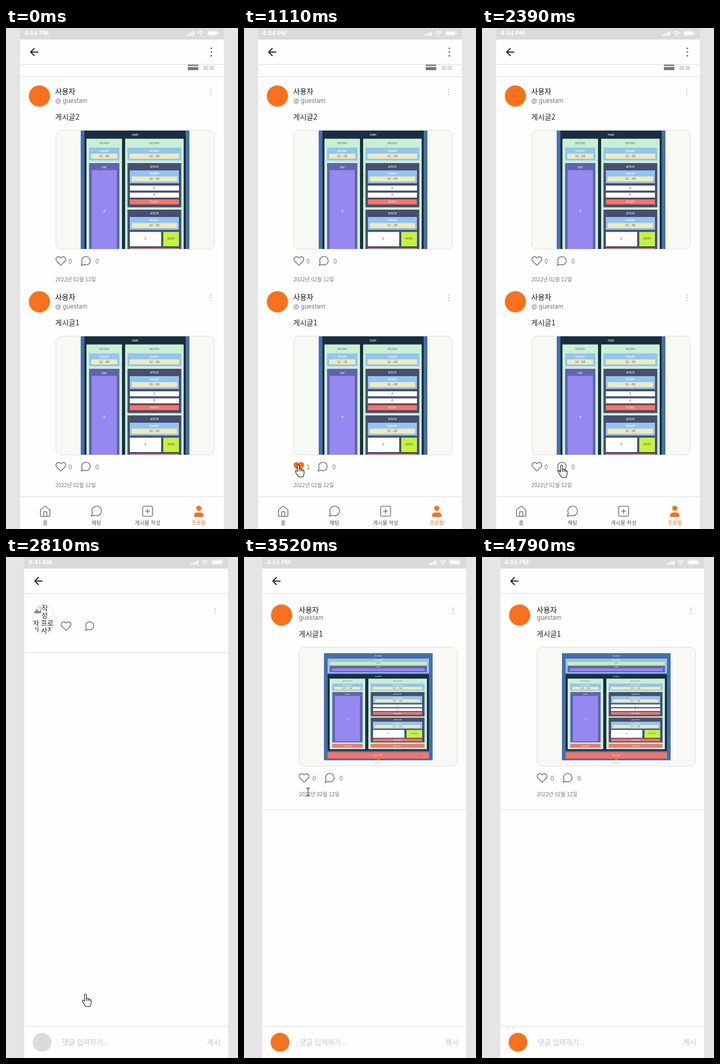
Recreate the animation shown at these times as an HTML page. Size 444 by 957 pixels, loop 5380 ms.

```html
<!DOCTYPE html>
<html lang="ko">
<head>
<meta charset="utf-8">
<title>게시글</title>
<style>
html, body { margin: 0; width: 100%; height: 100%; overflow: hidden; background: #e5e5e5; }
svg { display: block; width: 444px; height: 957px; }
text { font-family: "Noto Sans CJK KR", "Noto Sans CJK", sans-serif; white-space: pre; }
.latin { font-family: Inter, sans-serif; }
.line { fill: none; stroke: #767676; stroke-linecap: round; stroke-linejoin: round; }
.liked .heart { fill: #f9711a; stroke: #f9711a; }
.rule { stroke: #dbdbdb; }
</style>
</head>
<body>
<svg id="stage" viewBox="0 0 444 957"></svg>
<script>
const LOOP = 5380;
const GRAY = '#767676', PALE = '#c4c4c4', ORANGE = '#f9711a';
const USER = 'guestam';

const text = (x, y, s, size, fill = GRAY, more = '') =>
  `<text x="${x}" y="${y}" font-size="${size}" fill="${fill}" ${more}>${s}</text>`;
const box = (x, y, w, h, fill, more = '') =>
  `<rect x="${x}" y="${y}" width="${w}" height="${h}" fill="${fill}" ${more}/>`;
const disc = (x, y, r, fill, more = '') =>
  `<circle cx="${x}" cy="${y}" r="${r}" fill="${fill}" ${more}/>`;
const rule = y => `<path class="rule" d="M27 ${y}h390"/>`;
const group = (id, body, more = '') => `<g id="${id}" ${more}>${body}</g>`;
const dots = (x, y, gap, r, fill) =>
  [-gap, 0, gap].map(d => disc(x, y + d, r, fill)).join('');

// Line icons on a 24 unit grid, centred on x, y
const icon = (d, x, y, scale = 1, cls = '') =>
  `<path class="line ${cls}" stroke-width="${1.6 / scale}" d="${d}" transform="translate(${x} ${y}) scale(${scale}) translate(-12 -12)"/>`;
const HEART = 'M20.84 4.61a5.5 5.5 0 0 0-7.78 0L12 5.67l-1.06-1.06a5.5 5.5 0 0 0-7.78 7.78L12 21.23l8.84-8.84a5.5 5.5 0 0 0 0-7.78z';
const BUBBLE = 'M21 11.5a8.4 8.4 0 0 1-.9 3.8 8.5 8.5 0 0 1-7.6 4.7 8.4 8.4 0 0 1-3.8-.9L3 21l1.9-5.7a8.4 8.4 0 0 1-.9-3.8 8.5 8.5 0 0 1 4.7-7.6 8.4 8.4 0 0 1 3.8-.9h.5a8.5 8.5 0 0 1 8 8z';
const HOME = 'M3 9.5l9-7.5 9 7.5V20a2 2 0 0 1-2 2H5a2 2 0 0 1-2-2zM9 22v-9h6v9';
const PLUS = 'M5 2.5h14a2.5 2.5 0 0 1 2.5 2.5v14a2.5 2.5 0 0 1-2.5 2.5H5A2.5 2.5 0 0 1 2.5 19V5A2.5 2.5 0 0 1 5 2.5zM12 8v8M8 12h8';

const statusBar = clock =>
  box(27, 0, 390, 22, '#dadada') +
  text(35, 14, clock, 11.5, '#fff', 'class="latin" font-weight="600"') +
  [0, 1, 2, 3].map(i => box(346 + i * 3.8, 12 - i * 1.8, 2.6, 3 + i * 1.8, '#fff', 'rx=".6"')).join('') +
  `<g fill="none" stroke="#fff" stroke-width="1.7"><path d="M366.5 9a8.5 8.5 0 0 1 12 0M369 11.6a5 5 0 0 1 7 0"/></g>` +
  disc(372.5, 13.8, 1.3, '#fff') +
  box(385.5, 5.5, 20, 9, 'none', 'rx="2.5" stroke="#f1f1f1"') +
  box(387, 7, 17, 6, '#fff', 'rx="1.3"') + box(406.5, 8.5, 1.2, 3.4, '#f1f1f1');

const frame = clock =>
  box(27, 0, 390, 957, '#fefefe') + statusBar(clock) + rule(69.5) +
  `<path d="M61 46H47.5M54 39.2L47.2 46l6.8 6.8" fill="none" stroke="#1c2433" stroke-width="2" stroke-linecap="round" stroke-linejoin="round"/>`;

// Layout diagram shown in every post
function diagram() {
  const C = {
    blue: '#4570a6', sky: '#91c5f2', lime: '#c5f241', indigo: '#6163b0', violet: '#9588f0',
    navy: '#1b2e41', mint: '#caf0d3', cream: '#f3eab5', slate: '#474e70', coral: '#ff7264'
  };
  const tag = (x, y, s, fill = '#fff') =>
    text(x, y + 1.8, s, 5.6, fill, 'class="latin" text-anchor="middle"');
  const block = (x, y, w, h, fill, s, at = h / 2, ink) =>
    box(x, y, w, h, fill) + (s ? tag(x + w / 2, y + at, s, ink) : '');
  const head = (x, y, w, pad) =>
    block(x, y, w, 24.5, C.sky, 'header', 6.5) +
    block(x + pad, y + 11.5, w - 2 * pad, 9.5, C.cream, 'h2 - h6', 5, '#555b70');
  const foot = (x, y, w, h) => block(x, y, w, h, C.coral, 'footer');
  const article = (y, h) => block(137.5, y, 103, h, C.slate, 'article', 7) + head(142, y + 14, 94, 3.5);
  return block(48, -72, 208, 372, C.blue, 'body', 9) +
    block(55, -53, 194, 51, C.sky, 'header', 6) +
    block(59, -42, 186, 11, '#d5ee91', 'h1', 5, '#555b70') +
    block(59, -28, 186, 22, C.indigo, 'nav', 4) +
    box(63, -19, 178, 9, C.violet) +
    block(55, 1, 194, 266, C.navy, 'main', 8) +
    block(59, 16.5, 68, 245, C.mint, 'section', 9, '#5f7068') +
    block(133, 16.5, 112, 245, C.mint, 'section', 9, '#5f7068') +
    head(64, 33.5, 58, 4) + head(137.5, 33.5, 103, 4) +
    block(64, 63, 58, 175, C.indigo, 'nav', 8) +
    block(69, 76.5, 48, 158, C.violet, 'ul') +
    foot(64, 243, 58, 13) + foot(137.5, 243, 103, 13) +
    article(63, 84.5) +
    block(142, 106, 94, 9.5, '#fff', 'p', 4, '#555') +
    block(142, 119.5, 94, 9.5, '#fff', 'p', 4, '#555') +
    foot(142, 132.5, 94, 9.5) +
    article(152, 86) +
    block(142, 194.5, 60, 27.5, '#fff', 'p', 13, '#555') +
    block(206, 194.5, 30, 27.5, C.lime, 'aside', 13, '#55702c') +
    foot(142, 225.5, 94, 9) + foot(55, 272, 194, 22) +
    `<ellipse cx="152" cy="294" rx="3" ry="5" fill="${ORANGE}"/>` +
    tag(152, 310, 'layout', '#ccc');
}

const card = (x, y, scaleY) =>
  `<g transform="translate(${x} ${y})">` + box(.5, .5, 303, 227, '#f8f8f5', 'rx="10"') +
  `<g clip-path="url(#round)"><g transform="translate(0 114) scale(1 ${scaleY}) translate(0 -114)">${diagram()}</g></g>` +
  box(.5, .5, 303, 227, 'none', 'rx="10" stroke="#dbdbdb"') + '</g>';

const avatar = (x, y) => disc(x, y, 20.5, ORANGE, 'stroke="#dbdbdb" stroke-width=".8"');

const reactions = (x, y, gap, id) =>
  group(id, icon(HEART, x, y, .9, 'heart') +
    text(x + gap, y + 4.5, '0', 12, GRAY, 'class="count"') +
    `<g class="reply">${icon(BUBBLE, x + 36 + gap * .8, y, .95)}${text(x + 51.5 + gap, y + 4.5, '0', 12)}</g>`);

const post = (y, title, id) =>
  `<g transform="translate(0 ${y})">` + avatar(64, 130) +
  text(94, 126, '사용자', 14, '#111', 'font-weight="500"') +
  text(94.5, 143, '@ ' + USER, 11.5, GRAY, 'class="latin"') +
  dots(392, 122, 5, 1.3, PALE) + text(94, 175, title, 14, '#222') +
  card(95, 195, 1) + reactions(105, 445, 14.5, id) +
  text(94.5, 483.5, '2022년 02월 12일', 10) + '</g>';

const navItem = (x, label, art, fill = '#555') =>
  art + text(x, 949, label, 10, fill, 'text-anchor="middle"');

const listPage = frame('4:54 PM') + dots(393, 46, 7, 1.7, GRAY) + rule(92.5) +
  box(348, 70, 20, 2.5, GRAY) + box(348, 74.5, 20, 6, GRAY) +
  box(378, 72, 9, 8.5, '#dbdbdb') + box(389, 72, 9, 8.5, '#dbdbdb') +
  post(0, '게시글2', 'like0') + post(393, '게시글1', 'like1') + rule(895.5) +
  navItem(75, '홈', icon(HOME, 75, 923)) +
  navItem(173, '채팅', icon(BUBBLE, 173, 923, 1.08)) +
  navItem(271, '게시물 작성', icon(PLUS, 271, 923)) +
  navItem(369, '프로필', disc(369, 917.5, 5, ORANGE) +
    `<path d="M360 934v-3a5.5 5.5 0 0 1 5.5-5.5h7a5.5 5.5 0 0 1 5.5 5.5v3z" fill="${ORANGE}"/>`, ORANGE);

const commentBar = fill => rule(896.5) + disc(61, 927, 18, fill) +
  text(99, 932, '댓글 입력하기...', 13.5, PALE) +
  text(376.5, 932, '게시', 14, PALE, 'font-weight="500"');

const alt = (x, y, s) => text(x, y, s, 13, '#222');
const emptyPage = frame('9:41 AM') + dots(392, 103, 5, 1.3, PALE) +
  group('broken', `<g clip-path="url(#oval)">` +
    `<path d="M45 92h10l4 4v11H45z" fill="#dce8fa" stroke="#8a8f98"/><path d="M45 107l6-7 4 4 4-2v5z" fill="#5da04c"/>` +
    alt(60, 102, '작') + alt(60, 116, '성') + alt(43.5, 130.5, '자 프로') + alt(43.5, 144.5, '필 사진') + '</g>' +
    `<ellipse cx="64" cy="119" rx="20.5" ry="28.5" fill="none" stroke="#dbdbdb"/>`) +
  icon(HEART, 107, 132, .9) + icon(BUBBLE, 152, 132, .9) + rule(182.5) + commentBar('#dbdbdb');

const detailPage = frame('4:55 PM') + avatar(64, 111) +
  text(96.5, 106, '사용자', 14, '#111', 'font-weight="500"') +
  text(97, 120, USER, 11.5, GRAY, 'class="latin"') +
  dots(392, 103, 5, 1.3, PALE) + text(96.5, 152, '게시글1', 14, '#222') +
  card(97, 172, .55) + reactions(107, 422, 16, 'like2') +
  text(97, 456.5, '2022년 02월 12일', 10) + rule(482.5) + commentBar(ORANGE);

const pointers =
  group('hand', `<path d="M-1.8 1.8a1.8 1.8 0 0 1 3.6 0V8.6c.4-1.2 3.2-1.1 3.4.3v.8c.4-1 2.9-.9 3.1.5v.9c.6-.9 2.7-.6 2.7.9v5c0 2.5-1.8 3.8-2 6.5H.3c-.3-2.4-2.8-3.9-4.3-6.8C-5.300 14.200-6.600 12.400-5.200 11.500c1.300-.7 2.500.6 3.400 2.100z"/><path d="M1.800 8.600v4.500M5.200 9.700v3.600M8.300 11v2.500" fill="none"/>`) +
  group('arrow', `<path d="M0 0v16.500l3.900-3.700 2.600 6 2.600-1.100-2.600-5.900h5.300z"/>`) +
  group('beam', `<path d="M-3.500-7.500h2.500l1 1 1-1h2.500M0-6.500v13M-3.500 7.500h2.500l1-1 1 1h2.500" fill="none"/>`);

const $ = id => document.getElementById(id);
$('stage').innerHTML =
  `<defs><clipPath id="round"><rect x=".5" y=".5" width="303" height="227" rx="10"/></clipPath>` +
  `<clipPath id="oval"><ellipse cx="64" cy="119" rx="20.5" ry="28.5"/></clipPath></defs>` +
  group('list', listPage) +
  group('empty', emptyPage, 'transform="translate(8 0)"') +
  group('detail', detailPage, 'transform="translate(8 0)"') +
  group('cursor', pointers, 'fill="#fff" stroke="#111" stroke-width="1.1" stroke-linejoin="round"');

// Pointer stops: time, x, y
const STOPS = [
  [250, 330, 700], [610, 119, 815], [690, 119, 815], [1050, 104, 834], [2150, 104, 834],
  [2390, 152, 835], [3120, 152, 835], [3540, 122.5, 448], [3650, 115, 424],
  [4660, 115, 424], [4790, 260, 620]
];

function pointerAt(t) {
  const i = STOPS.findIndex(s => s[0] > t);
  if (i < 1) return null;
  const [t0, x0, y0] = STOPS[i - 1], [t1, x1, y1] = STOPS[i];
  const k = (t - t0) / (t1 - t0), e = k * (2 - k);
  return [x0 + (x1 - x0) * e, y0 + (y1 - y0) * e];
}

const show = (id, on) => { $(id).style.display = on ? '' : 'none'; };
const within = (t, a, b) => t >= a && t < b;

function like(id, on) {
  const g = $(id);
  g.classList.toggle('liked', on);
  g.querySelector('.count').textContent = on ? 1 : 0;
  g.querySelector('.reply').setAttribute('transform', `translate(${on ? -2 : 0} 0)`);
}

function draw(t) {
  show('list', t < 2680);
  show('empty', within(t, 2680, 2930));
  show('broken', t >= 2780);
  show('detail', t >= 2930);
  like('like1', within(t, 1040, 1950));
  like('like2', within(t, 3950, 4400));

  const p = pointerAt(t);
  show('cursor', p);
  if (!p) return;
  const shape = within(t, 3120, 3460) || t > 4680 ? 'arrow' : within(t, 3460, 3580) ? 'beam' : 'hand';
  ['hand', 'arrow', 'beam'].forEach(s => show(s, s === shape));
  $('cursor').setAttribute('transform', `translate(${p[0]} ${p[1]})`);
}

const start = performance.now();
function tick() {
  draw((performance.now() - start) % LOOP);
  requestAnimationFrame(tick);
}
tick();
</script>
</body>
</html>
```
